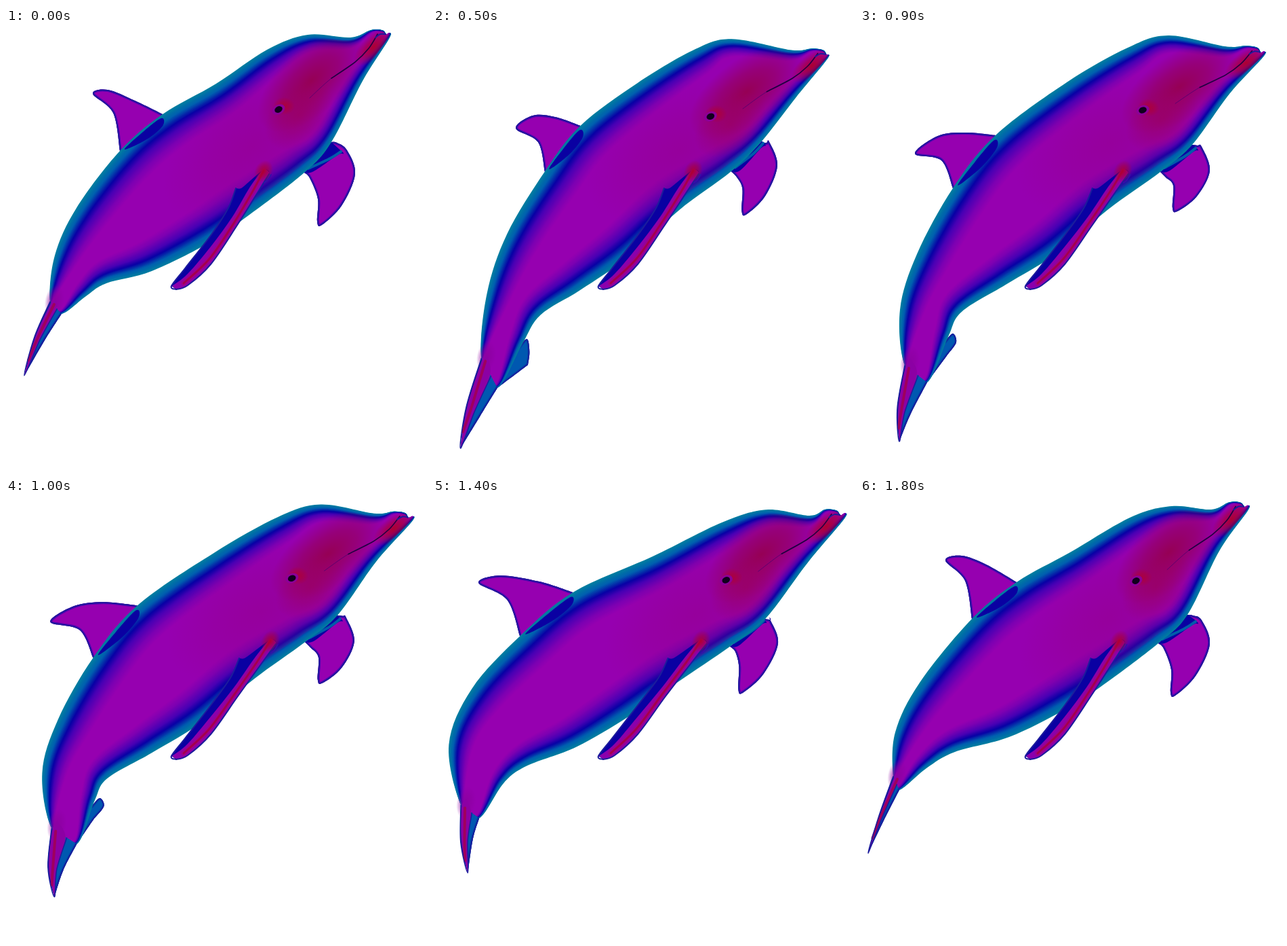
Recreate the animation shown at these times as an HTML page with a canvas. Size 621x651 px, loop 1900 ms.

```html
<!DOCTYPE html>
<html>
<head>
<meta charset="utf-8">
<style>
html, body { margin: 0; width: 100%; height: 100%; overflow: hidden; background: #fff; }
canvas { display: block; }
</style>
</head>
<body>
<canvas id="stage" width="621" height="651"></canvas>
<script>
const ctx = document.getElementById('stage').getContext('2d');
const LOOP = 1900, STEP = 100;
const times = [0, 300, 700, 900, 1200, 1600, 1800];

// Each row is one pose: x, y pairs.
const eyeKeys = [
  [402,120], [404,127], [415,131], [417,121], [431,116], [428,126], [407,122]];
// Brow to tail stock.
const backKeys = [
  [508,14, 445,10, 385,32, 310,82, 231,127, 168,181, 104,265, 72,335, 65,403],
  [517,20, 450,12, 390,28, 305,77, 222,136, 170,197, 112,285, 83,365, 73,452],
  [538,42, 435,19, 385,34, 300,85, 212,152, 156,226, 102,322, 72,415, 68,513],
  [538,27, 455,11, 395,29, 305,80, 200,158, 137,236, 84,333, 59,415, 66,497],
  [553,19, 480,10, 415,28, 310,85, 188,154, 118,227, 65,305, 42,380, 66,466],
  [550,32, 495,23, 430,42, 335,85, 228,124, 145,180, 57,262, 13,350, 20,438],
  [518,17, 460,12, 400,28, 310,80, 231,124, 165,178, 88,272, 52,345, 49,410]];
// Tail stock to lower jaw.
const bellyKeys = [
  [82,421, 118,395, 148,376, 215,358, 300,316, 355,278, 440,213, 480,168, 526,78, 566,14],
  [92,494, 137,432, 155,406, 218,376, 290,332, 360,270, 437,210, 478,165, 527,88, 569,28],
  [97,552, 125,488, 160,433, 215,392, 290,338, 365,268, 443,213, 490,172, 545,112, 594,60],
  [99,522, 130,455, 150,418, 215,378, 290,332, 365,268, 443,212, 490,172, 545,97, 596,41],
  [108,488, 127,432, 150,404, 215,372, 290,325, 365,266, 437,214, 487,175, 548,92, 607,23],
  [30,455, 84,408, 130,384, 210,360, 290,318, 355,278, 440,222, 492,180, 552,98, 602,35],
  [58,430, 98,398, 140,374, 220,352, 300,313, 355,278, 440,214, 483,172, 530,78, 573,17]];
// Near fluke: tip, left, right. Far fluke: top, side, bottom.
const tailKeys = [
  [27,512, 42,455, 57,460, 105,390, 105,393, 95,402],
  [35,574, 46,520, 66,530, 139,430, 140,447, 135,465],
  [47,650, 52,585, 72,600, 134,477, 140,495, 138,514],
  [58,609, 55,560, 74,570, 137,450, 142,463, 130,480],
  [89,553, 70,515, 98,510, 134,429, 141,440, 125,460],
  [8,554, 11,500, 17,500, 70,400, 60,405, 50,415],
  [12,523, 28,468, 35,475, 85,395, 85,398, 75,405]];
// Dorsal fin: front edge, crest, tip, rear edge.
const finKeys = [
  [190,107, 150,91, 128,97, 158,125], [187,120, 155,111, 130,124, 160,150],
  [172,143, 135,147, 109,171, 145,185], [155,154, 115,159, 81,185, 120,195],
  [130,144, 80,149, 45,165, 95,184], [188,102, 128,80, 100,87, 132,117],
  [186,98, 150,85, 126,92, 155,122]];
// Far flipper: tip, outermost point.
const flipperKeys = [
  [461,290, 515,215], [458,282, 507,205], [458,268, 511,203], [463,270, 516,210],
  [457,279, 508,212], [450,293, 512,215], [460,291, 516,215]];

// How deep the rim shading reaches at each outline point.
const depths = [16, 26, 40, 50, 56, 56, 50, 36, 6,
  6, 22, 34, 46, 54, 54, 44, 30, 22, 6, 3, 4, 5];
const ramp = [[0, 0,125,160], [.18, 0,95,175], [.38, 8,0,165],
  [.55, 72,0,180], [.8, 125,0,178], [1, 150,0,176]];

const NAVY = '#0a00a2', EDGE = '#1c1c9c', MAGENTA = '#9600b0', BLUE = '#0058b0';

const mix = (a, b, u) => [a[0] + (b[0] - a[0]) * u, a[1] + (b[1] - a[1]) * u];
const shift = (p, x, y) => [p[0] + x, p[1] + y];

// Periodic cubic interpolation through the poses.
function pose(keys, t) {
  const n = times.length;
  const time = i => times[(i + n) % n] + LOOP * Math.floor(i / n);
  const key = i => keys[(i + n) % n];
  let i = n - 1;
  while (times[i] > t) i--;
  const span = time(i + 1) - time(i), u = (t - time(i)) / span;
  const slope = (j, c) => (key(j + 1)[c] - key(j - 1)[c]) / (time(j + 1) - time(j - 1)) * span;
  const points = [];
  key(i).forEach((a, c) => {
    const b = key(i + 1)[c], ma = slope(i, c), mb = slope(i + 1, c);
    const v = a + u * (ma + u * (3 * (b - a) - 2 * ma - mb + u * (2 * (a - b) + ma + mb)));
    if (c % 2) points[points.length - 1].push(v); else points.push([v]);
  });
  return points;
}

function spline(pts, closed = false, path) {
  const n = pts.length;
  const at = i => closed ? pts[(i + n) % n] : pts[Math.max(0, Math.min(n - 1, i))];
  if (path) path.lineTo(...pts[0]);
  else (path = new Path2D()).moveTo(...pts[0]);
  for (let i = 0; i < (closed ? n : n - 1); i++) {
    const [a, b, c, d] = [at(i - 1), at(i), at(i + 1), at(i + 2)];
    path.bezierCurveTo(b[0] + (c[0] - a[0]) / 6, b[1] + (c[1] - a[1]) / 6,
      c[0] - (d[0] - b[0]) / 6, c[1] - (d[1] - b[1]) / 6, ...c);
  }
  return path;
}
const leaf = (one, two) => spline(two, false, spline(one));

function fill(path, color) {
  ctx.fillStyle = color;
  ctx.fill(path);
}
function line(path, color, width) {
  ctx.strokeStyle = color;
  ctx.lineWidth = width;
  ctx.stroke(path);
}
function shaded(path, color, rim = '#5000b0') {
  fill(path, color);
  ctx.save();
  ctx.clip(path);
  line(path, rim, 6);
  line(path, EDGE, 3.5);
  ctx.restore();
}
function glow([x, y], rx, ry, angle, rgb, alpha) {
  ctx.save();
  ctx.translate(x, y);
  ctx.rotate(angle);
  ctx.scale(rx, ry);
  const g = ctx.createRadialGradient(0, 0, 0, 0, 0, 1);
  g.addColorStop(0, `rgba(${rgb},${alpha})`);
  g.addColorStop(.5, `rgba(${rgb},${alpha * .6})`);
  g.addColorStop(1, `rgba(${rgb},0)`);
  ctx.fillStyle = g;
  ctx.fillRect(-1, -1, 2, 2);
  ctx.restore();
}
function rampColor(k) {
  let i = 0;
  while (i < ramp.length - 2 && ramp[i + 1][0] < k) i++;
  const a = ramp[i], b = ramp[i + 1], u = (k - a[0]) / (b[0] - a[0]);
  return `rgb(${[1, 2, 3].map(c => Math.round(a[c] + (b[c] - a[c]) * u))})`;
}
function inset(pts, k) {
  const n = pts.length;
  return pts.map((p, i) => {
    const a = pts[(i + n - 1) % n], b = pts[(i + 1) % n];
    const dx = b[0] - a[0], dy = b[1] - a[1], d = depths[i] * k / Math.hypot(dx, dy);
    return [p[0] + dy * d, p[1] - dx * d];
  });
}

function drawFarParts(belly, tail, flipper) {
  const [stock] = belly, [root, throat] = [belly[6], belly[7]];
  const [, , , top, side, bottom] = tail;
  shaded(leaf([shift(top, -12, 12), top, side, bottom], [bottom, stock]), BLUE, '#0045a8');

  const [tip, out] = flipper;
  const crown = shift(out, -12, -35);
  const blade = spline([throat, shift(throat, 8, 1), crown, out, shift(mix(out, tip, .55), 10, 5),
    shift(tip, 5, 0), shift(tip, -2, -5), shift(tip, -1, -38), shift(root, 8, 8), root]);
  shaded(blade, MAGENTA);
  const under = spline([root, shift(root, 14, -2), mix(root, crown, .78),
    shift(crown, -5, 5), shift(crown, -12, -2), throat]);
  fill(under, NAVY);
  line(spline([shift(root, 6, -6), shift(mix(root, crown, .6), 0, -1), shift(crown, -9, 2)]), '#005caa', 4);
}

function drawBody(outline, back) {
  for (let k = 0; k <= 1.001; k += .025) fill(spline(inset(outline, k), true), rampColor(k));
  const [front, rear] = [back[4], back[5]];
  const dx = rear[0] - front[0], dy = rear[1] - front[1], len = Math.hypot(dx, dy);
  const on = (u, v) => shift(mix(front, rear, u), dy / len * v, -dx / len * v);
  fill(spline([on(.07, 3), on(.13, 13), on(.5, 13), on(.92, 3), on(.5, 1)], true), NAVY);
}

function drawTail(back, belly, tail) {
  const top = back[8], [stock, flank] = belly, [tip, left, right] = tail;
  glow(mix(top, flank, .12), 14, 24, .2, '140,0,160', .9);
  shaded(leaf([top, left, tip], [tip, right, stock]), BLUE, '#003ca8');
  const start = shift(mix(top, flank, .12), 0, -6);
  const inner = mix(left, right, .58);
  fill(leaf([start, shift(top, 1, 3), shift(left, 1.5, 0), tip],
    [tip, inner, mix(top, stock, .55), start]), '#8c00a4');
  line(spline([shift(top, 6, 4), mix(left, inner, .55), mix(left, tip, .6)]), 'rgba(165,0,70,.75)', 4);
  line(spline([top, left, tip, inner, mix(top, stock, .6)]), EDGE, 1.5);
}

function drawFlipper(sway) {
  const at = (x, y, w = 0) => [x + sway * w, y];
  const outer = [at(388,215,1), at(372,241,.7), at(340,292,.2), at(302,348), at(268,379), at(251,385)];
  const inner = [at(244,380), at(264,354), at(303,304), at(328,265,.3), at(339,236,.5)];
  fill(leaf([at(339,236,.5), at(347,236,.5), at(359,226,.7), at(380,209,1), ...outer], inner), NAVY);
  const strip = leaf([at(380,207,1), ...outer],
    [at(245,380), at(268,362), at(302,322), at(334,278,.3), at(360,234,.8), at(380,207,1)]);
  fill(strip, '#8b00ac');
  ctx.save();
  ctx.clip(strip);
  const ridge = spline([at(380,210,1), at(363,242,.7), at(335,289,.2), at(300,340), at(262,376)]);
  line(ridge, '#9a0090', 8);
  line(ridge, '#a5004c', 3);
  ctx.restore();
  line(spline(outer), EDGE, 2);
  line(spline([at(251,385), ...inner]), EDGE, 2);
  glow(at(380,211,1), 13, 17, .5, '175,0,50', .9);
  line(spline([at(381,228,1), at(386,224,1), at(391,216,1)]), '#3510a8', 2);
}

function draw(t) {
  const [eye] = pose(eyeKeys, t), back = pose(backKeys, t), belly = pose(bellyKeys, t);
  const tail = pose(tailKeys, t), fin = pose(finKeys, t), flipper = pose(flipperKeys, t);
  const jaw = belly[9];
  const turn = Math.atan2(jaw[1] - eye[1], jaw[0] - eye[0]) + .574;
  const cos = Math.cos(turn), sin = Math.sin(turn);
  const head = (x, y) => shift(eye, x * cos - y * sin, x * sin + y * cos);
  const outline = [...back, ...belly, head(159,-111), head(153,-117), head(136,-117)];
  const sway = (eye[0] - 402) / 2;

  ctx.clearRect(0, 0, 621, 651);
  ctx.lineCap = ctx.lineJoin = 'round';
  drawFarParts(belly, tail, flipper);
  shaded(spline([back[4], ...fin, back[5]]), MAGENTA);
  drawBody(outline, back);

  ctx.save();
  ctx.clip(spline(inset(outline, .25), true));
  glow(head(-40, 55), 150, 85, turn - .65, '150,0,140', .55);
  glow(head(48, -42), 98, 48, turn - .75, '150,0,75', .9);
  glow(head(30, 8), 60, 40, turn - .8, '155,0,95', .7);
  glow(head(140, -92), 36, 17, turn - .75, '175,0,35', .9);
  ctx.restore();

  drawTail(back, belly, tail);
  drawFlipper(sway);

  line(spline([head(46,-17), head(78,-46), head(113,-70)]), 'rgba(80,0,110,.8)', 1);
  line(spline([head(78,-46), head(113,-70), head(133,-90), head(146,-111)]), '#200040', 1.6);
  line(spline([head(143,-106), head(150,-111), head(158,-111)]), EDGE, 2);

  glow(head(8, -5), 16, 13, turn, '180,0,40', .7);
  const oval = (rx, ry, color) => {
    const path = new Path2D();
    path.ellipse(...eye, rx, ry, turn - .5, 0, 7);
    fill(path, color);
  };
  oval(10, 7, '#8c0098');
  oval(6, 4.5, '#10001c');
}

function frame(now) {
  draw(Math.floor(now % LOOP / STEP) * STEP);
  requestAnimationFrame(frame);
}
requestAnimationFrame(frame);
</script>
</body>
</html>
```
